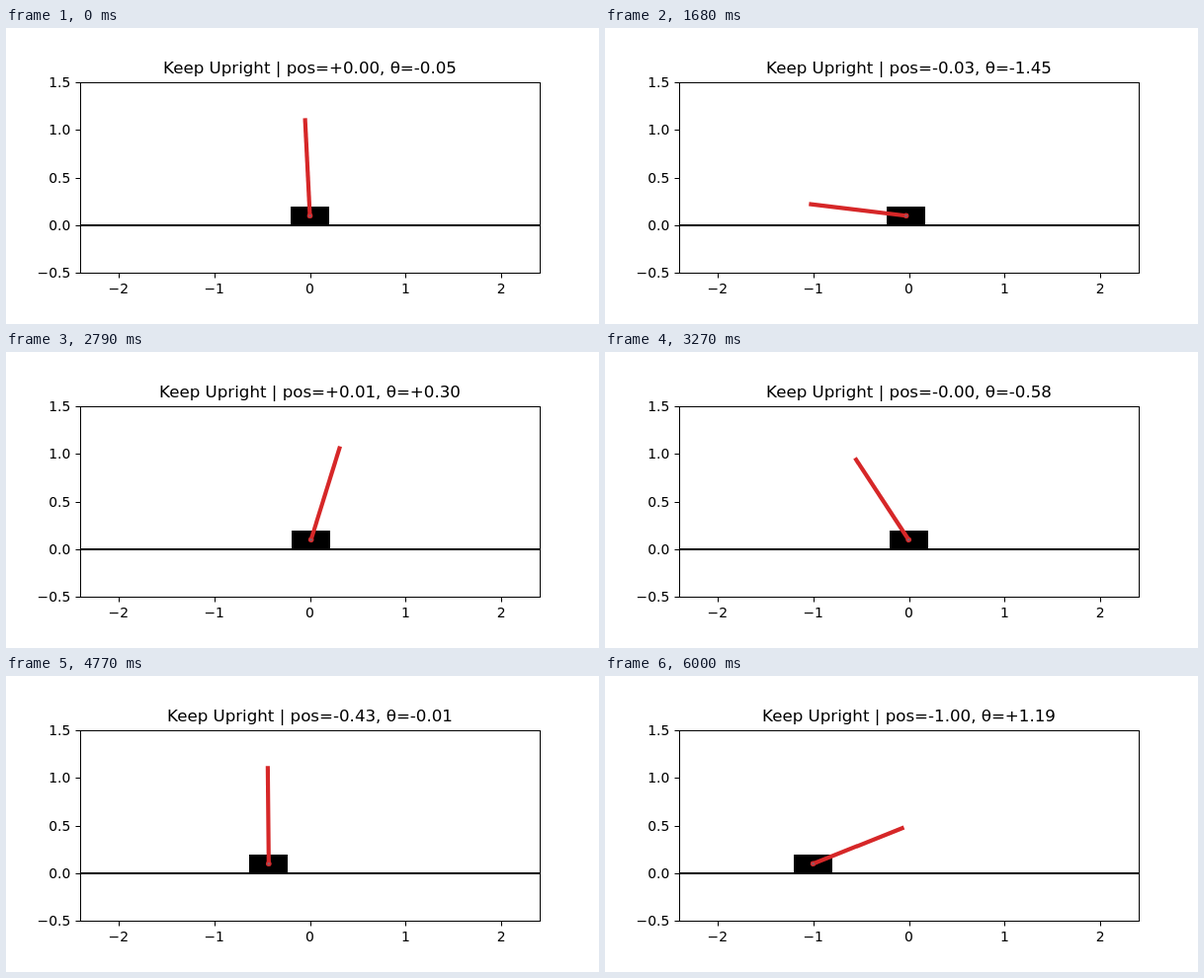
These frames come from a looping animation (600x300 px, 6030 ms). An HTML page:

```html
<!DOCTYPE html>
<html lang="en">
<head>
<meta charset="utf-8">
<title>Keep Upright</title>
<style>
  html, body { margin: 0; width: 100%; height: 100%; overflow: hidden; background: #fff; }
  svg { display: block; width: 600px; height: 300px; font-family: "DejaVu Sans", sans-serif; }
</style>
</head>
<body>
<svg id="stage" viewBox="0 0 600 300">
  <defs><clipPath id="plot"><rect x="75" y="54.6" width="465" height="193.8"/></clipPath></defs>
  <g clip-path="url(#plot)">
    <rect id="cart" fill="#000" shape-rendering="crispEdges"/>
    <path d="M75 200H540" stroke="#000" stroke-width="2"/>
    <path id="pole" stroke="#d62728" stroke-width="4.17" stroke-linecap="square"/>
    <circle class="pivot" r="2.8" fill="#d62728"/>
    <circle class="pivot" r="1.5" fill="#9a5560"/>
  </g>
  <g id="axes" font-size="13.89"></g>
  <rect x="75.5" y="55.5" width="465" height="193" fill="none" stroke="#000"/>
  <text id="title" x="307.5" y="46" font-size="16.67" text-anchor="middle"></text>
</svg>
<script>
const STEP = 30, LOOP = 6030, LAST = 200, UNIT = 96.875, OMEGA = 0.08, TAU = 2 * Math.PI;
const $ = id => document.getElementById(id);
const px = x => 307.5 + UNIT * x;
const py = y => 199.9375 - UNIT * y;

function add(tag, attrs, text = "") {
  const el = document.createElementNS("http://www.w3.org/2000/svg", tag);
  for (const key in attrs) el.setAttribute(key, attrs[key]);
  el.textContent = text;
  $("axes").append(el);
}

const minus = s => s.replace("-", "\u2212");
const snap = v => Math.floor(v + 0.5) + 0.5;
for (let v = -2; v <= 2; v++) {
  add("path", { d: `M${snap(px(v))} 249v4.5`, stroke: "#000" });
  add("text", { x: px(v), y: 269, "text-anchor": "middle" }, minus(String(v)));
}
for (let v = -0.5; v <= 1.5; v += 0.5) {
  const y = snap(py(v));
  add("path", { d: `M70.5 ${y}H75`, stroke: "#000" });
  add("text", { x: 65.3, y: y + 4.5, "text-anchor": "end" }, minus(v.toFixed(1)));
}

// Pole: unwound lean to the left, as [step, angle], joined by pendulum swings.
const leans = [
  [0, 0.05], [56, 1.45], [77, TAU - 1.68], [109, TAU + 0.58],
  [130, TAU + 2.89], [159, 2 * TAU + 0.01], [200, 3 * TAU - 1.19]
];

function swing(angle, speed, omega, steps) {
  const path = [angle], sub = 10, dt = 1 / sub, k = omega * omega;
  for (let i = 1; i <= steps * sub; i++) {
    speed += k * Math.sin(angle) * dt / 2;
    angle += speed * dt;
    speed += k * Math.sin(angle) * dt / 2;
    if (i % sub === 0) path.push(angle);
  }
  return path;
}

// Bisect for the parameter that lands the swing on its end angle.
function shoot(run, goal) {
  let lo = 0, hi = 0.3;
  for (let i = 0; i < 45; i++) {
    const mid = (lo + hi) / 2;
    if (run(mid).at(-1) < goal) lo = mid; else hi = mid;
  }
  return run((lo + hi) / 2);
}

const lean = [leans[0][1]];
for (let i = 0; i < leans.length - 1; i++) {
  const [n0, a] = leans[i], [n1, b] = leans[i + 1];
  const run = i === 0
    ? omega => swing(a, 0, Math.min(omega, 0.1), n1 - n0)
    : speed => swing(a, speed, OMEGA, n1 - n0);
  lean.push(...shoot(run, b).slice(1));
}

// Cart: smooth curve through [step, position].
const track = [
  [0, 0], [22, 0.0045], [40, -0.005], [56, -0.03], [64, 0.004], [77, 0.003], [92, 0.012],
  [106, 0.003], [109, -0.003], [130, -0.14], [159, -0.43], [176, -0.64], [200, -1]
];

function slope(i) {
  const a = track[Math.max(i - 1, 0)], b = track[Math.min(i + 1, track.length - 1)];
  return (b[1] - a[1]) / (b[0] - a[0]);
}

function cartAt(n) {
  let i = 0;
  while (i < track.length - 2 && n >= track[i + 1][0]) i++;
  const [n0, a] = track[i], [n1, b] = track[i + 1];
  const w = n1 - n0, s = (n - n0) / w, r = 1 - s;
  return r * r * (1 + 2 * s) * a + s * s * (3 - 2 * s) * b
    + w * s * r * (r * slope(i) - s * slope(i + 1));
}

const signed = v => (v < 0 ? "-" : "+") + Math.abs(v).toFixed(2);

function draw(time) {
  const n = Math.min(LAST, Math.floor((time % LOOP) / STEP));
  const pos = n < 2 ? 0 : cartAt(n);
  const theta = -(lean[n] - TAU * Math.round(lean[n] / TAU));
  const left = Math.round(px(pos - 0.2)), top = Math.round(py(0.2));
  const set = (el, attrs) => { for (const key in attrs) el.setAttribute(key, attrs[key]); };

  set($("cart"), { x: left, y: top, width: Math.round(px(pos + 0.2)) - left, height: 200 - top });
  set($("pole"), {
    d: `M${px(pos)} ${py(0.1)}L${px(pos + Math.sin(theta))} ${py(0.1 + Math.cos(theta))}`
  });
  document.querySelectorAll(".pivot").forEach(el => set(el, { cx: px(pos), cy: py(0.1) }));
  $("title").textContent = `Keep Upright | pos=${signed(pos)}, θ=${signed(theta)}`;
}

const start = performance.now();
function tick() {
  draw(performance.now() - start);
  requestAnimationFrame(tick);
}
tick();
</script>
</body>
</html>
```
